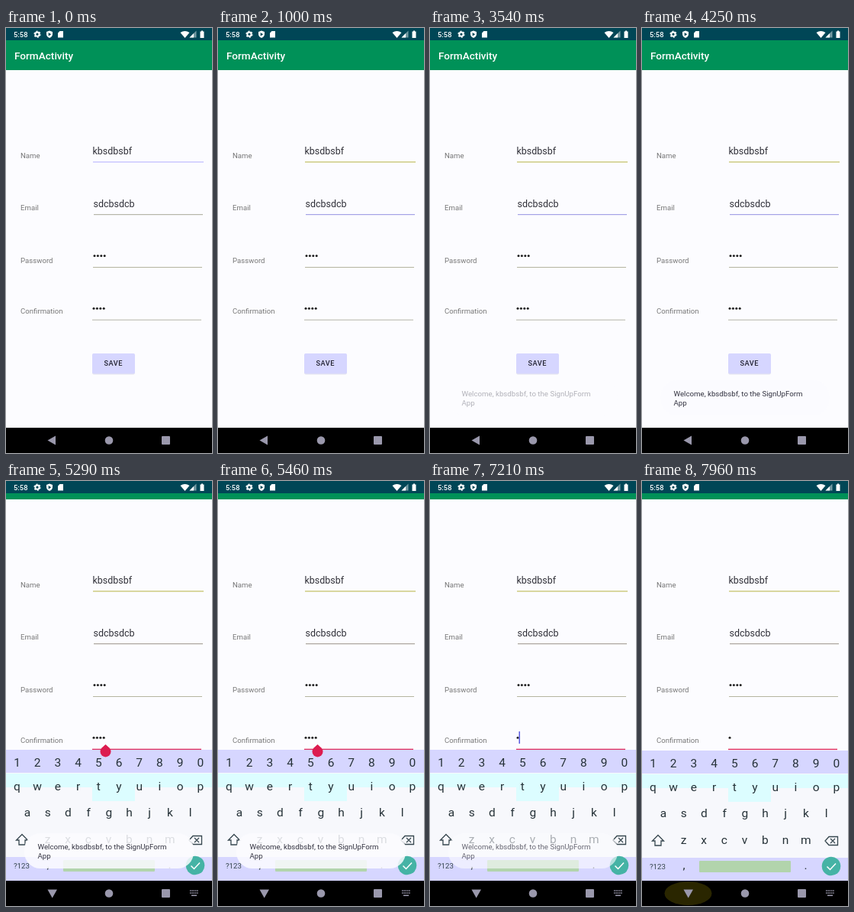
An HTML page that plays this animation: 270x555 px, repeating every 8000 ms.

```html
<!DOCTYPE html>
<html lang="en">
<head>
<meta charset="utf-8">
<title>Form</title>
<style>
  html, body { margin: 0; width: 100%; height: 100%; overflow: hidden; background: #fcfcff; }
  svg { display: block; width: 100%; height: 100%; font-family: Roboto, sans-serif; }
  .label { font-size: 9.65px; fill: #777; }
  .value { font-size: 12.5px; fill: #303038; }
  .key { font-size: 15.5px; fill: #263238; text-anchor: middle; }
  .small { font-size: 9.7px; fill: #333340; }
</style>
</head>
<body>
<svg viewBox="0 0 270 555">
  <rect width="270" height="555" fill="#fcfcff"/>

  <g id="page">
    <rect y="16" width="270" height="39" fill="#009158"/>
    <text x="11" y="41" font-size="13.6" font-weight="500" fill="#fff">FormActivity</text>
    <g class="label">
      <text x="19" y="170">Name</text>
      <text x="19" y="238">Email</text>
      <text x="19" y="306.5">Password</text>
      <text x="19" y="372.5">Confirmation</text>
    </g>
    <g class="value">
      <text x="113.5" y="164.5">kbsdbsbf</text>
      <text x="114.5" y="233.5">sdcbsdcb</text>
    </g>
    <g id="password" fill="#222"></g>
    <g id="confirm" fill="#222"></g>
    <rect id="cursor" x="116.5" y="358" width="1.5" height="16" fill="#5a5ae0"/>
    <rect id="nameLine" x="114" y="174.3" width="145" height="1.4"/>
    <rect id="emailLine" x="115" y="243" width="143" height="1.2"/>
    <rect x="114" y="312" width="143" height="1" fill="#b5b5a0"/>
    <rect id="confirmLine" x="113" y="380.7" width="143"/>
    <rect x="113" y="425.5" width="56" height="27" rx="2" fill="#e6e6ee"/>
    <rect x="113" y="425" width="56" height="26.5" rx="2" fill="#d6d6ff"/>
    <text x="128.5" y="441.3" font-size="9.2" font-weight="500" letter-spacing=".5" fill="#222230">SAVE</text>
  </g>

  <g id="keyboard">
    <rect y="351" width="270" height="210" fill="#f7f8fc"/>
    <rect y="351" width="270" height="30" fill="#d6d6ff"/>
    <path d="M0 382H270V400H169V418H113V400H0Z" fill="#dcfdff"/>
    <rect y="491" width="270" height="70" fill="#d6d6ff"/>
    <rect x="75" y="495" width="120" height="15" rx="1" fill="#b2d4ac"/>
    <g id="keys" class="key"></g>
    <text x="10" y="505.5" font-size="9.7" fill="#37474f">?123</text>
    <path d="M21 461.5L28.5 469H25V475H17V469H13.5Z" fill="none" stroke="#37474f" stroke-width="1.3"/>
    <path d="M245 463.5H256.5V474.5H245L240 469ZM247 466L253 472M253 466L247 472" fill="none" stroke="#37474f" stroke-width="1.3"/>
    <circle cx="248" cy="502" r="12.3" fill="#45b3a5"/>
    <path d="M242.5 502.5L246.5 506.5L254 498.5" fill="none" stroke="#fff" stroke-width="1.5"/>
  </g>

  <path id="handle" d="M130.5 344L135.5 348.5A7 7 0 1 1 125.5 348.5Z" fill="#dc1c50"/>

  <g id="toast" class="small">
    <rect x="24" y="460" width="222" height="46" rx="21" fill="#fcfcff" fill-opacity=".85"/>
    <text x="41.5" y="481">Welcome, kbsdbsbf, to the SignUpForm</text>
    <text x="41.5" y="492.5">App</text>
  </g>

  <rect width="270" height="16" fill="#004656"/>
  <g fill="#fff">
    <text x="10" y="11.8" font-size="9.4" font-weight="500">5:58</text>
    <circle cx="41" cy="8.2" r="2.6" fill="none" stroke="#fff" stroke-width="2"/>
    <circle cx="41" cy="8.2" r="4" fill="none" stroke="#fff" stroke-width="1.2" stroke-dasharray="2.1"/>
    <path d="M57 3.5L61 5V8C61 10.500 59 12.300 57 13C55 12.300 53 10.500 53 8V5Z"/>
    <path d="M55.700 6L59.200 8.200L55.700 10.400Z" fill="#004656"/>
    <path d="M70.500 4H75V12.500H68V6.500Z"/>
    <path d="M228.500 6Q234.500 2 240.500 6L234.500 13Z"/>
    <path d="M249.500 3.500V12.500H240.500Z" opacity=".45"/>
    <path d="M246 7V12.500H240.500Z"/>
    <path d="M256 3.500H258V4.500H259.500V13H254.500V4.500H256Z"/>
  </g>

  <rect y="522" width="270" height="33"/>
  <ellipse id="ripple" cx="60.500" cy="538.500" rx="31" ry="15.500" fill="#2a2600"/>
  <g fill="#9a98ac">
    <path id="back" d="M54.500 538.500L65 532.500V544.500Z"/>
    <path id="hide" d="M54.500 533.500H67L60.700 544.500Z"/>
    <circle cx="135" cy="538.500" r="5.300"/>
    <rect x="204" y="533" width="11" height="11" rx="1"/>
    <g id="switcher">
      <path d="M241 535H252M241 538H252" stroke="#9a98ac" stroke-width="1.600" stroke-dasharray="1.500 .8"/>
      <rect x="243" y="540.500" width="7" height="1.500"/>
    </g>
  </g>
</svg>

<script>
const LOOP = 8000;
const TAP = 4720, OPEN = 4790, CLOSE = 7960;
const DELETES = [6250, 6650, 7050];
const PAN = 31, KEYBOARD_HEIGHT = 171;

const el = id => document.getElementById(id);
const ramp = (t, start, length) => Math.min(1, Math.max(0, (t - start) / length));
const easeOut = p => 1 - (1 - p) ** 3;
const show = (id, visible) => el(id).setAttribute('visibility', visible ? 'visible' : 'hidden');
const shift = (id, y) => el(id).setAttribute('transform', `translate(0 ${y})`);
const paint = (id, fill) => el(id).setAttribute('fill', fill);

const keyRow = (chars, x, y) => [...chars].map((char, i) =>
  `<text x="${x + i * 26.7}" y="${y}">${char}</text>`).join('');
el('keys').innerHTML = keyRow('1234567890', 14.5, 372.5) + keyRow('qwertyuiop', 14.5, 403.5) +
  keyRow('asdfghjkl', 28, 438) + keyRow('zxcvbnm', 54.5, 473) +
  keyRow(',', 55, 506) + keyRow('.', 214.5, 506);

const dots = (x, y) => [0, 1, 2, 3].map(i =>
  `<circle cx="${x + i * 4.4}" cy="${y}" r="1.5"/>`).join('');
el('password').innerHTML = dots(116, 297.5);
el('confirm').innerHTML = dots(115, 366.3);

function draw(t) {
  const opening = easeOut(ramp(t, OPEN, 240));
  const typing = t >= TAP;
  const keyboardOpen = t >= OPEN;
  const firstFocus = t < 40;

  shift('page', -PAN * opening);
  shift('keyboard', KEYBOARD_HEIGHT * (1 - opening) + (t >= CLOSE ? 1 : 0));
  show('keyboard', keyboardOpen);

  paint('nameLine', firstFocus ? '#c6c4ff' : '#cbc878');
  paint('emailLine', firstFocus ? '#b5b5a8' : typing ? '#aaa49c' : '#a4a2e6');
  paint('confirmLine', typing ? '#de2e60' : '#b5b5a8');
  el('confirmLine').setAttribute('height', typing ? 1.4 : 1);

  const deleted = DELETES.filter(time => t >= time);
  const left = 4 - deleted.length;
  [...el('confirm').children].forEach((dot, i) =>
    dot.setAttribute('visibility', i < left ? 'visible' : 'hidden'));

  // The caret restarts its blink after every tap or deletion.
  const lastEdit = deleted.at(-1) ?? TAP;
  show('cursor', typing && (t - lastEdit) % 1000 < 500);
  shift('cursor', 0);
  el('cursor').setAttribute('x', 116.5 + (left - 1) * 4.4);
  show('handle', t >= OPEN + 200 && left === 4);

  el('toast').setAttribute('opacity', ramp(t, 3450, 250) * (1 - ramp(t, 7130, 300)));
  show('ripple', t >= 7880);
  show('back', !keyboardOpen);
  show('hide', keyboardOpen);
  show('switcher', keyboardOpen);
}

function tick() {
  draw(performance.now() % LOOP);
  requestAnimationFrame(tick);
}
tick();
</script>
</body>
</html>
```
